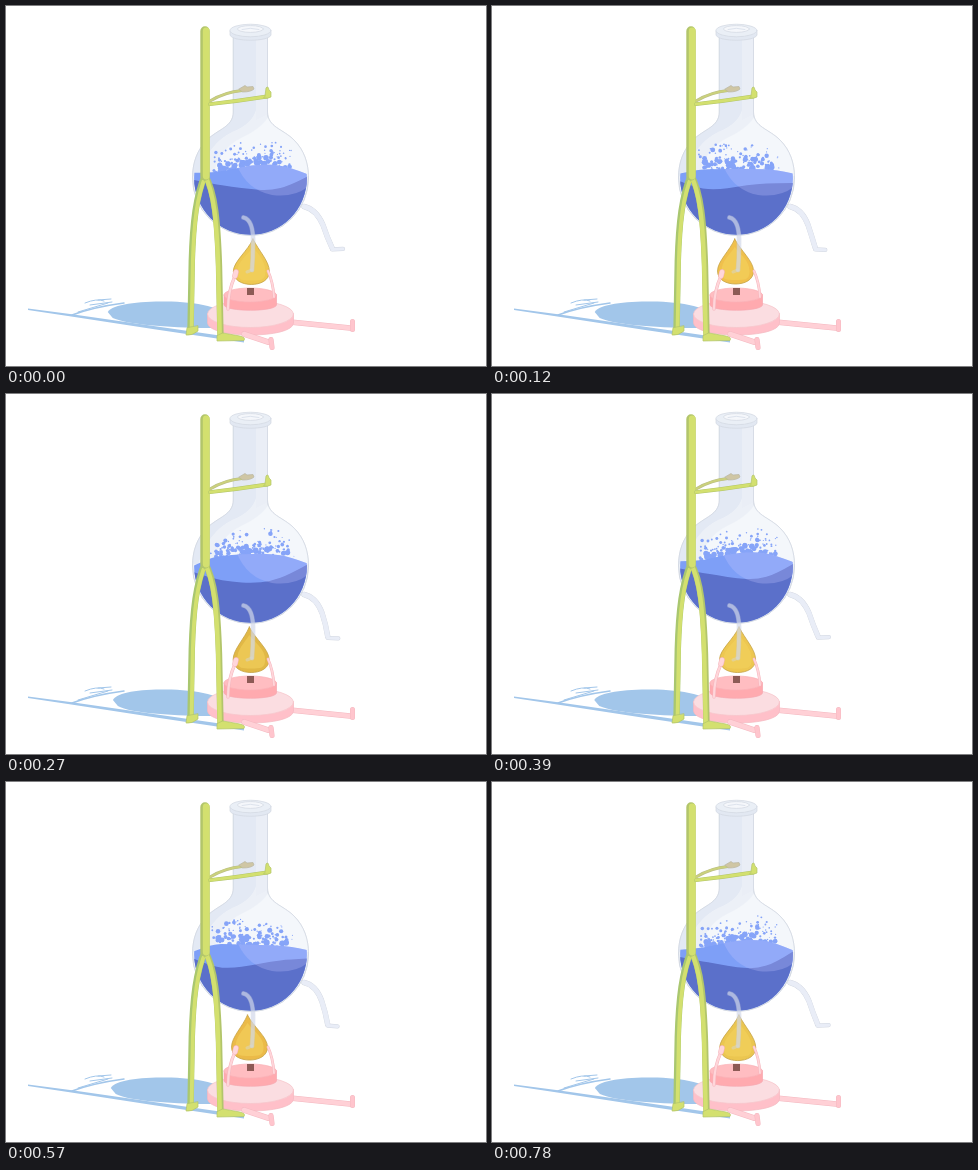
An HTML page with a canvas for the animation above (810 ms loop, 480 by 360 pixels).

```html
<!DOCTYPE html>
<html lang="en">
<head>
<meta charset="utf-8">
<title>Flask over a burner</title>
<style>
html, body { margin: 0; width: 100%; height: 100%; overflow: hidden; background: #fff; }
canvas { display: block; }
</style>
</head>
<body>
<canvas id="stage" width="480" height="360"></canvas>
<script>
const c = document.getElementById('stage').getContext('2d');
const LOOP = 810, STEP = 30, TAU = Math.PI * 2;
c.lineCap = c.lineJoin = 'round';

function fill(d, color, edge, w = 0.7) {
  const p = typeof d === 'string' ? new Path2D(d) : d;
  c.fillStyle = color;
  c.fill(p);
  if (edge) {
    c.strokeStyle = edge;
    c.lineWidth = w;
    c.stroke(p);
  }
}

function line(d, color, w) {
  c.strokeStyle = color;
  c.lineWidth = w;
  c.stroke(new Path2D(d));
}

function limb(d, w, color, edge) {
  line(d, edge, w + 1);
  line(d, color, w);
}

function oval(x, y, rx, ry, color, edge) {
  const p = new Path2D();
  p.ellipse(x, y, rx, ry, 0, 0, TAU);
  fill(p, color, edge);
}

// Smooth cycle through three evenly spaced poses.
function blend(phase, poses) {
  const w = poses.map((_, i) => (1 + 2 * Math.cos(TAU * (phase + 0.02 - i / 3))) / 3);
  const sum = k => w.reduce((s, v, i) => s + v * poses[i][k], 0);
  return poses[0].map((_, k) => sum(k));
}

function random(seed) {
  return () => {
    seed = (seed * 16807) % 2147483647;
    return seed / 2147483647;
  };
}

const FRONT = [
  [174, 178, 181, 184, 185, 180, 169],
  [175, 183, 184, 181, 178, 177, 177],
  [178, 185, 188, 189, 187, 180, 170]
];
const BACK = [
  [167, 167, 163, 159, 158, 161, 169],
  [168, 163, 163, 163, 163, 164, 168],
  [172, 162, 161, 160, 160, 163, 170]
];
// Tip x, tip y, left, right, bottom.
const FLAME = [
  [247, 233, 227.5, 263.5, 278.5],
  [242.5, 233, 225.5, 261.5, 278],
  [243, 233, 227, 263, 278.5]
];
// Knee x, ankle x, ankle y, toe x, toe y.
const FOOT = [
  [317, 326, 244, 337, 243],
  [316, 323, 244, 333, 244],
  [316, 321.5, 244.5, 332, 244.5]
];

const BODY = 'M227.3 30V106C227.3 121 212 123 201 134C191 144 186.5 157 186.5 172' +
  'A58 57.5 0 0 0 302.5 172C302.5 157 298 144 288 134C277 123 261.5 121 261.5 106V30Z';
const GLARE = 'M230 157Q240 184 266 189Q289 192 303 180L303 140H230Z';

const rnd = random(4817);
const drops = Array.from({ length: 130 }, (_, i) => {
  const low = i < 44, a = rnd() * 2 - 1;
  return {
    x: 246 + a * (low ? 36 : 40),
    drift: a * 6,
    h: low ? 3 + rnd() * 9 : 8 + rnd() * (20 - 6 * a * a),
    r: low ? 1.6 + rnd() * 1.8 : 0.7 + rnd() * rnd() * 2.4,
    at: rnd()
  };
});

function shadow(phase) {
  const blue = '#a2c6ea';
  const [x] = blend(phase, [[102], [103], [107]]);
  fill(`M${x} 306C${x + 5} 298 132 295.5 160 295.5C190 295.5 219 302 227 312L218 322` +
    `C180 322.5 125 320 ${x + 5} 312Z`, blue);
  fill('M22 302.5L66 308.3L238 333V336.5L150 323.5L62 310L22 304Z', blue);
  line('M66 309Q88 301 118 297', blue, 1.5);
  line('M72 306L102 297M79 297Q91 292 98 295M84 299L106 296M92 294L105 293', blue, 1);
}

function burner() {
  const edge = '#f4b9c1';
  limb('M284 316L344 322', 4.6, '#ffd0d6', edge);
  limb('M346.5 315.5V323.5', 4, '#ffc5cd', edge);
  fill('M201.5 308V317C203 333 287 333 287.5 317V308Z', '#ffc0c9', edge);
  oval(244.5, 308, 43, 13.5, '#fbdde1', '#f7c4cb');
  fill('M218 289V299C220 306 269 306 270.5 299V289Z', '#ffaaaf', '#f7a8b0');
  oval(244.2, 289, 26.3, 7, '#ffbdc1', '#f9b2b8');
  fill('M241 282H248V289H241Z', '#8d5a55');
}

function flame(phase) {
  const [x, y, l, r, b] = blend(phase, FLAME), m = (l + r) / 2;
  const drop = (k) => `M${x} ${y + k * 2}C${x - 5} ${y + 12 + k} ${l + k} ${b - 23} ${l + k} ${b - 13}` +
    `C${l + k} ${b - 4} ${m - 9} ${b - k} ${m} ${b - k}` +
    `C${m + 9} ${b - k} ${r - k} ${b - 4} ${r - k} ${b - 13}` +
    `C${r - k} ${b - 23} ${x + 6} ${y + 12 + k} ${x} ${y + k * 2}Z`;
  const [red, g, blue] = blend(phase, [[238, 200, 82], [240, 192, 76], [226, 184, 70]]);
  fill(drop(0), `rgb(${red | 0},${g | 0},${blue | 0})`, '#c6a244', 0.8);
  fill(drop(4), 'rgba(243,211,94,.6)');
}

function burnerArms() {
  limb('M222 303Q222 285 229 270', 2.2, '#ffd6da', '#f5b5bd');
  limb('M229 270L230 266', 4.5, '#ffd6da', '#f5b5bd');
  limb('M268 291Q267 276 262 265', 1.8, '#ffd6da', '#f5b5bd');
}

function edgeOf(ys) {
  const pts = ys.map((y, i) => [187 + i * 19.4, y]);
  let d = `L${pts[0].join(' ')}`;
  for (let i = 1; i < 6; i++) {
    const [x, y] = pts[i], n = pts[i + 1];
    d += `Q${x} ${y} ${i < 5 ? (x + n[0]) / 2 : n[0]} ${i < 5 ? (y + n[1]) / 2 : n[1]}`;
  }
  return d;
}

function liquid(phase) {
  const back = blend(phase, BACK);
  const body = ys => new Path2D('M183 240' + edgeOf(ys) + 'L306 240H183Z');
  const bowl = new Path2D();
  bowl.ellipse(244.5, 172, 56.4, 56.8, 0, 0, TAU);
  c.save();
  c.clip(bowl);
  for (const d of drops) {
    const u = (phase + d.at) % 1;
    const x = d.x + d.drift * (u - 0.5);
    const s = (x - 187) / 19.4, i = s | 0;
    const top = back[i] + (back[i + 1] - back[i]) * (s - i);
    const size = d.r * (1 - 0.35 * u);
    oval(x, top + 1 - d.h * 4 * u * (1 - u), size, size, '#86a4f8');
  }
  const surface = body(back);
  fill(surface, '#7e9ff7');
  fill(body(blend(phase, FRONT)), '#5b70ca');
  c.clip(surface);
  fill(GLARE, 'rgba(200,200,255,.27)');
  c.restore();
}

function flask(phase) {
  const edge = '#d2d7e1';
  const [kx, ax, ay, tx, ty] = blend(phase, FOOT);
  const leg = `M298 200.5Q310 203 ${kx} 219Q${kx + 4} 231 ${ax} ${ay - 2}`;
  limb(leg, 4.4, '#e9edf7', edge);
  limb(`M${ax} ${ay - 0.5}L${tx} ${ty}`, 3.2, '#e9edf7', edge);
  line(leg, '#e9edf7', 4.2);

  fill(BODY, '#ecf0f7', edge);
  c.save();
  c.clip(new Path2D(BODY));
  fill('M226 30H250V104Q246 118 226 126Q203 137 192 170H184V128Z', '#e3e9f4');
  fill('M264 108Q257 122 235 132Q213 143 207 170H303V115Z', '#f4f7fb');
  fill('M250 30H262V108L250 114Z', '#eaeef6');
  c.restore();
  liquid(phase);
  line(BODY, edge, 0.7);

  fill('M224 25V29C226 36 263 36 265 29V25Z', '#e2e8f2', edge);
  oval(244.5, 24.5, 20.5, 6.3, '#eaeff6', edge);
  oval(244.5, 23, 13, 3.4, '#f5f7fb', edge);
  line('M236 23.5Q244 21 253 23.5', '#dde3ed', 1);

  const dip = 'M237.5 211.5Q248 214 247 239Q247 253 246 264';
  c.save();
  c.globalAlpha = 0.45;
  line(dip, '#c6cddd', 4.8);
  line(dip, '#d7deef', 3.6);
  line('M246 264L241 266', '#d3d8d7', 3);
  c.restore();
}

function stand() {
  const lime = '#d3e06f', dark = '#b2c56b';
  const left = 'M199 169C190 190 187 216 185.8 255L184.5 325';
  const right = 'M199 169C209 186 211.5 216 213 260L214.5 331';
  line(left, '#a9c76f', 6.4);
  line('M200 169C191 190 188 216 186.8 255L185.5 325', lime, 3.8);
  line(right, dark, 6.4);
  line('M198.5 169C208 186 210.7 216 212.2 260L213.8 331', lime, 4.4);
  fill('M181 322L180 329Q186 330 192 325V320Z', lime, dark);
  fill('M211 330V335L238 334.5Q240 331 234 330L217 327Z', lime, dark);
  line('M199 25V170', dark, 9.4);
  line('M200.2 25V170', lime, 6.8);
  limb('M204 98.2Q232 95 261 90.5', 2.8, lime, dark);
  fill('M259 90L260 82Q262 79 263 84L265 86V91Q262 93 258 92Z', lime, dark);
}

function rearArm() {
  limb('M204 95Q219 86 236 84.5', 1.9, '#cbd17c', '#b8bd86');
  fill('M233 83L239 79.5L241 81L247 80.5L248 83Q245 86 237 86Z', '#cfc6a4', '#b9b6a3');
}

function draw(time) {
  const t = Math.floor((time % LOOP) / STEP) * STEP;
  const phase = (t / (LOOP / 2)) % 1;
  c.clearRect(0, 0, 480, 360);
  shadow(phase);
  burner();
  flame(phase);
  burnerArms();
  flask(phase);
  rearArm();
  stand();
  limb('M238 328L262 336', 4.6, '#ffd0d6', '#f4b9c1');
  limb('M265 333.5L266 341.5', 4.2, '#ffc5cd', '#f4b9c1');
}

const start = performance.now();
function tick() {
  draw(performance.now() - start);
  requestAnimationFrame(tick);
}
tick();
</script>
</body>
</html>
```
